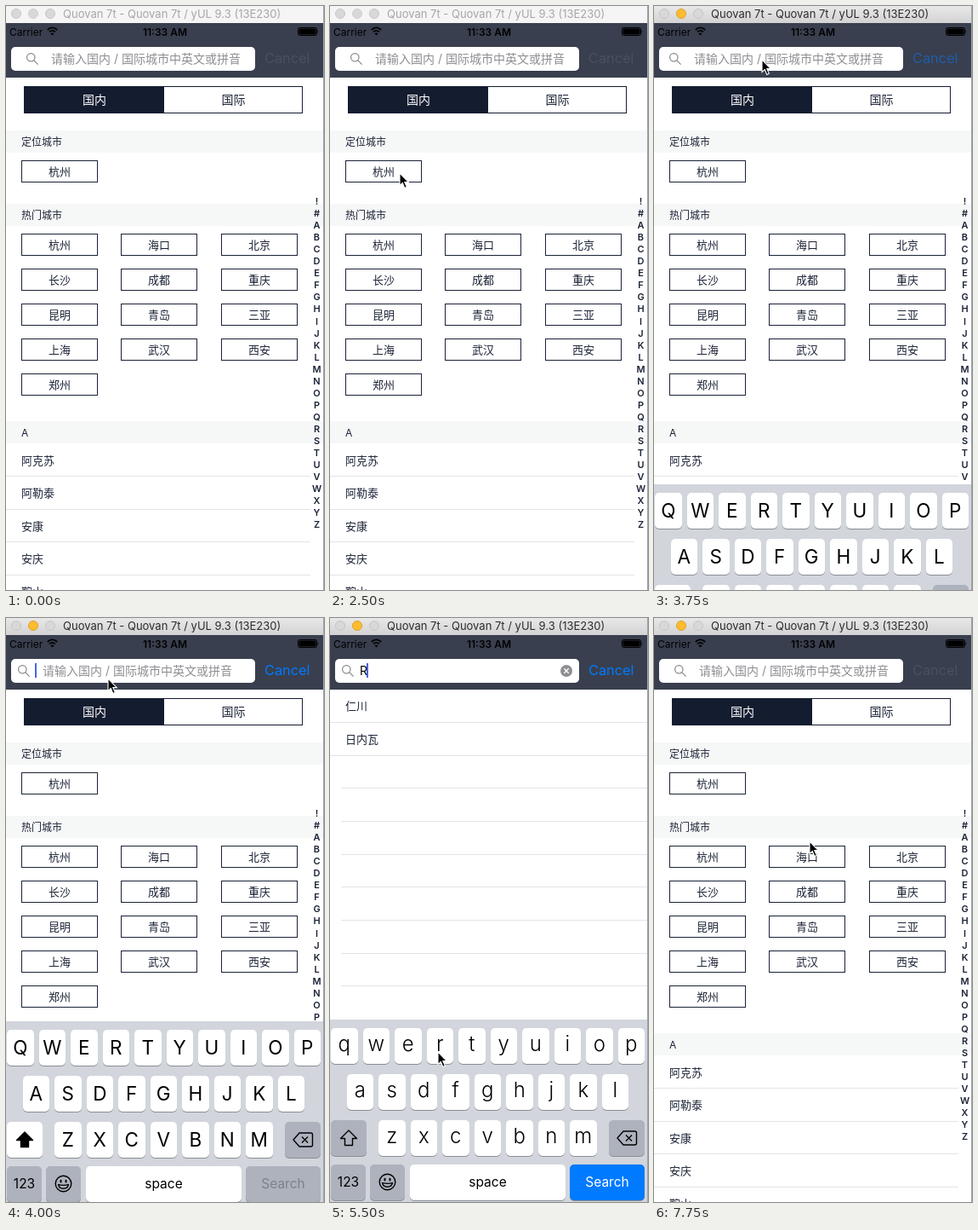
An HTML page for the animation above (8 s loop, 374 px wide and 685 px high).

```html
<!DOCTYPE html>
<html lang="zh-CN">
<head>
<meta charset="utf-8">
<title>City picker</title>
<style>
html, body { margin: 0; width: 100%; height: 100%; overflow: hidden; background: #fff; }
body, .stage { font-family: Inter, "Noto Sans CJK SC", "Noto Sans CJK", sans-serif; }
.stage { position: relative; width: 374px; height: 685px; overflow: hidden; background: #fff; color: #1b2336; }
.stage * { box-sizing: border-box; }
.abs, .stage svg, .stage i, .stage b { position: absolute; white-space: nowrap; font-style: normal; }
/* every part jumps four times a second at most */
.an { animation: 8s step-end infinite; }

.title { left: 0; top: 0; width: 373px; height: 20px; line-height: 19px; padding-left: 67px; font-size: 13px; animation-name: title; }
.title i { top: 3px; width: 12px; height: 12px; border-radius: 50%; border: 1px solid #c6c6c6; background: #d8d8d8; }
.title .amber { left: 26px; animation-name: amber; }
@keyframes title {
  0% { background: #f5f5f5; color: #a6a6a6; }
  40.625%, 100% { background: linear-gradient(#e8e8e8, #d3d3d3); color: #2c2c2c; }
}
@keyframes amber {
  0% { background: #d8d8d8; border-color: #cfcfcf; }
  40.625%, 100% { background: #fdbd2e; border-color: #e0a028; }
}

.nav { left: 0; top: 20px; width: 373px; height: 64px; background: #393f4e; }
.status { top: 20px; height: 20px; line-height: 21px; font-size: 12px; color: #000; }
.field { left: 6px; top: 48px; width: 287px; height: 28px; border-radius: 5px; background: #fff; }
.hint { left: 53px; top: 48px; line-height: 28px; font-size: 14px; color: #8e8e93; animation-name: hint; }
@keyframes hint {
  0% { transform: none; opacity: 1; }
  46.875% { transform: translateX(-6px); opacity: 1; }
  50% { transform: translateX(-10px); opacity: 1; }
  68.75% { transform: translateX(-10px); opacity: 0; }
  90.625% { transform: translateX(-5px); opacity: 1; }
  93.75%, 100% { transform: none; opacity: 1; }
}
.lens { left: 23px; top: 54px; animation-name: lens; }
@keyframes lens {
  0% { transform: none; }
  46.875% { transform: translateX(-6px); }
  50% { transform: translateX(-10px); }
  90.625% { transform: translateX(-5px); }
  93.75%, 100% { transform: none; }
}
.cancel { left: 304px; top: 48px; line-height: 27px; font-size: 16.3px; animation-name: cancel; }
@keyframes cancel {
  0% { color: #4a5060; }
  46.875% { color: #1f5ea8; }
  50% { color: #007aff; }
  84.375% { color: #2a4d7c; }
  90.625% { color: #3c4a62; }
  93.75%, 100% { color: #4a5060; }
}
.caret { left: 34px; top: 53px; width: 2px; height: 17px; background: #4566e0; animation-name: caret; }
@keyframes caret {
  0% { opacity: 0; transform: none; }
  50% { opacity: 1; transform: none; }
  56.25% { opacity: 0; transform: none; }
  62.5% { opacity: 1; transform: none; }
  68.75% { opacity: 1; transform: translateX(9px); }
  75% { opacity: 0; transform: translateX(9px); }
  81.25% { opacity: 1; transform: translateX(9px); }
  90.625%, 100% { opacity: 0; transform: none; }
}

.seg { left: 21px; top: 94px; width: 328px; height: 32px; border: 1px solid #141c30; }
.seg b { top: 0; width: 163px; height: 30px; line-height: 30px; text-align: center; font-size: 14px; font-weight: 400; }
.seg b:first-child { left: 0; width: 164px; background: #141c30; color: #fff; }
.seg b:last-child { left: 164px; }
.head { left: 0; width: 373px; height: 26px; line-height: 27px; padding-left: 18px; font-size: 12px; background: #f6f7f7; }
.city { width: 90px; height: 26px; line-height: 25px; border: 1px solid #1a2238; text-align: center; font-size: 13px; }
.row { left: 18px; height: 38px; line-height: 38px; font-size: 13px; }
.line { height: 1px; background: #e4e4e6; }
.idx { left: 358px; width: 15px; height: 14px; line-height: 14px; text-align: center; font-size: 11px; font-weight: 600; color: #1b2336; }

.found { left: 0; top: 48px; width: 373px; height: 637px; animation-name: found; }
.sheet { left: 0; top: 36px; width: 373px; height: 601px; background: #fff; }
.typed { left: 35px; top: 0; line-height: 28px; font-size: 14px; color: #000; }
@keyframes found {
  0% { opacity: 0; }
  68.75% { opacity: 1; }
  90.625%, 100% { opacity: 0; }
}

.board { left: 0; top: 471px; width: 373px; height: 214px; background: #d2d5dc; color: #000; animation-name: board; }
@keyframes board {
  0% { transform: translateY(216px); }
  46.875% { transform: translateY(90px); }
  50% { transform: translateY(2px); }
  53.125% { transform: none; }
  90.625% { transform: translateY(110px); }
  93.75%, 100% { transform: translateY(216px); }
}
.key { height: 42px; line-height: 41px; border-radius: 5px; background: #fff; box-shadow: 0 1px #8b8e94; text-align: center; font-size: 15.5px; }
.dark { background: #adb2bc; }
.letter { width: 31.5px; animation-name: letter; }
@keyframes letter {
  0% { text-transform: uppercase; font-size: 22.5px; font-weight: 400; line-height: 42px; }
  68.75%, 100% { text-transform: none; font-size: 24px; font-weight: 300; line-height: 38px; }
}
.shift { animation-name: shift; }
@keyframes shift {
  0% { background: #fff; fill: #000; }
  68.75%, 100% { background: #adb2bc; fill: transparent; }
}
.go { animation-name: go; }
@keyframes go {
  0% { background: #adb2bc; color: #7c828d; }
  68.75%, 100% { background: #007aff; color: #fff; }
}

.mouse { left: 0; top: 0; animation-name: mouse; }
@keyframes mouse {
  0% { opacity: 0; transform: translate(218px, 240px); }
  9.375% { opacity: 1; transform: translate(217px, 239px); }
  12.5% { transform: translate(186px, 214px); }
  15.625% { transform: translate(146px, 174px); }
  18.75% { transform: translate(118px, 160px); }
  21.875% { transform: translate(108px, 188px); }
  25% { transform: translate(97px, 212px); }
  28.125% { transform: translate(84px, 199px); }
  31.25% { transform: translate(82px, 196px); }
  34.375% { transform: translate(96px, 174px); }
  37.5% { transform: translate(127px, 118px); }
  40.625% { transform: translate(129px, 76px); }
  43.75% { transform: translate(127px, 63px); }
  50% { transform: translate(120px, 71px); }
  53.125% { transform: translate(128px, 130px); }
  56.25% { transform: translate(166px, 350px); }
  59.375% { transform: translate(140px, 517px); }
  62.5% { transform: translate(127px, 509px); }
  71.875% { transform: translate(138px, 480px); }
  75% { transform: translate(220px, 290px); }
  78.125% { transform: translate(318px, 96px); }
  81.25% { transform: translate(338px, 40px); }
  84.375% { transform: translate(331px, 62px); }
  87.5% { transform: translate(323px, 98px); }
  90.625% { transform: translate(276px, 176px); }
  93.75% { transform: translate(214px, 240px); }
  96.875%, 100% { opacity: 1; transform: translate(183px, 262px); }
}
.edge { left: 373px; top: 0; width: 1px; height: 685px; background: #9aa4b0; }
</style>
</head>
<body>
<div class="stage">
  <div class="abs title an">Quovan 7t - Quovan 7t / yUL 9.3 (13E230)<i style="left:6px"></i><i class="amber an"></i><i style="left:46px"></i></div>
  <div class="abs nav"></div>
  <div class="abs status" style="left:4px">Carrier</div>
  <svg style="left:48px;top:24px" width="13" height="11" fill="none" stroke="#000" stroke-width="1.7"><path d="M.8 4Q6.5-1.2 12.2 4M3 6.4Q6.5 3.2 10 6.4"/><path d="M6.5 10.5 4.4 8.2Q6.5 6.6 8.6 8.2Z" fill="#000" stroke="none"/></svg>
  <div class="abs status" style="left:137px;width:100px;text-align:center;font-weight:600">11:33 AM</div>
  <svg style="left:343px;top:25px" width="26" height="10"><rect x=".5" y=".5" width="22" height="9" rx="2" fill="none" stroke="#000"/><rect x="1.5" y="1.5" width="20" height="7" rx="1"/><path d="M23.5 3q1.6 2 0 4z"/></svg>
  <div class="abs field"></div>
  <div class="abs hint an">请输入国内 / 国际城市中英文或拼音</div>
  <svg class="lens an" width="16" height="16" fill="none" stroke="#85858a" stroke-width="1.2"><circle cx="6.3" cy="6.3" r="4.7"/><path d="M9.7 9.7 14.6 14.6"/></svg>
  <div class="abs cancel an">Cancel</div>
  <div class="abs seg"><b>国内</b><b>国际</b></div>
  <div id="list"></div>
  <div class="abs found an">
    <div class="abs sheet" id="sheet"></div>
    <div class="abs typed">R</div>
    <svg style="left:271px;top:7px" width="14" height="14"><circle cx="7" cy="7" r="7" fill="#8e8e93"/><path d="M4.3 4.3l5.4 5.4m0-5.4-5.4 5.4" stroke="#fff" stroke-width="1.4"/></svg>
  </div>
  <div class="abs caret an"></div>
  <div class="abs board an" id="board">
    <div class="abs key shift an" style="left:1px;top:118px;width:42px"><svg style="left:10px;top:10px" width="22" height="22" stroke="#000" stroke-width="1.4" stroke-linejoin="round"><path d="M11 2 20.5 11.5H15.5V19.5H6.5V11.5H1.5Z"/></svg></div>
    <div class="abs key dark" style="left:328px;top:118px;width:42px"><svg style="left:9px;top:12px" width="25" height="18" fill="none" stroke="#000" stroke-width="1.4" stroke-linejoin="round"><path d="M8 1H21.5Q23.5 1 23.5 3V15Q23.5 17 21.5 17H8L1 9ZM11 5.5l7 7m0-7-7 7"/></svg></div>
    <div class="abs key dark" style="left:1px;top:170px;width:41px">123</div>
    <div class="abs key dark" style="left:47px;top:170px;width:41px"><svg style="left:10px;top:10px" width="21" height="21" fill="none" stroke="#000" stroke-width="1.4"><circle cx="10.5" cy="10.5" r="9.3"/><path d="M4.6 11.6q5.9 1.6 11.8 0-.8 4.6-5.9 4.6t-5.9-4.6z"/><path d="M7.5 6.8v1.6m6-1.6v1.6" stroke-width="2" stroke-linecap="round"/></svg></div>
    <div class="abs key" style="left:94px;top:170px;width:183px">space</div>
    <div class="abs key go an" style="left:282px;top:170px;width:88px">Search</div>
  </div>
  <div class="abs edge"></div>
  <svg class="mouse an" width="14" height="21" overflow="visible"><path d="M0 0V14.6L3.3 11.5 5.8 17.4 8.3 16.3 5.8 10.6H10.3Z" fill="#000" stroke="#fff" stroke-width="1.1"/></svg>
</div>
<script>
const $ = id => document.getElementById(id);

function add(box, cls, left, top, text = '', width) {
  const el = document.createElement('div');
  el.className = 'abs ' + cls;
  el.style.left = left + 'px';
  el.style.top = top + 'px';
  if (width) el.style.width = width + 'px';
  el.textContent = text;
  box.append(el);
}

const list = $('list'), sheet = $('sheet'), board = $('board');
const ROW = 38.65;

add(list, 'head', 0, 146, '定位城市');
add(list, 'head', 0, 232, '热门城市');
add(list, 'head', 0, 487, 'A');
add(list, 'city', 18, 181, '杭州');
'杭州 海口 北京 长沙 成都 重庆 昆明 青岛 三亚 上海 武汉 西安 郑州'.split(' ').forEach((name, i) =>
  add(list, 'city', 18 + Math.floor((i % 3) * 117.5), 267 + Math.floor(i / 3) * 41, name));
'阿克苏 阿勒泰 安康 安庆 鞍山'.split(' ').forEach((name, i) => {
  add(list, 'row', 18, Math.round(513.5 + i * ROW), name);
  add(list, 'line', 0, Math.round(551 + i * ROW), '', 358);
});
[...'!#ABCDEFGHIJKLMNOPQRSTUVWXYZ'].forEach((c, i) =>
  add(list, 'idx', 358, 222 + i * 14.05, c));

add(sheet, 'row', 18, 0, '仁川');
add(sheet, 'row', 18, 39, '日内瓦');
for (let i = 0; i < 9; i++) {
  const left = i < 2 ? 0 : 13;
  add(sheet, 'line', left, Math.round(38 + i * ROW), '', 373 - left);
}

[['qwertyuiop', 1, 10], ['asdfghjkl', 19.5, 64], ['zxcvbnm', 57, 118]].forEach(([keys, left, top]) =>
  [...keys].forEach((c, i) => add(board, 'key letter an', left + i * 37.5, top, c)));
</script>
</body>
</html>
```
